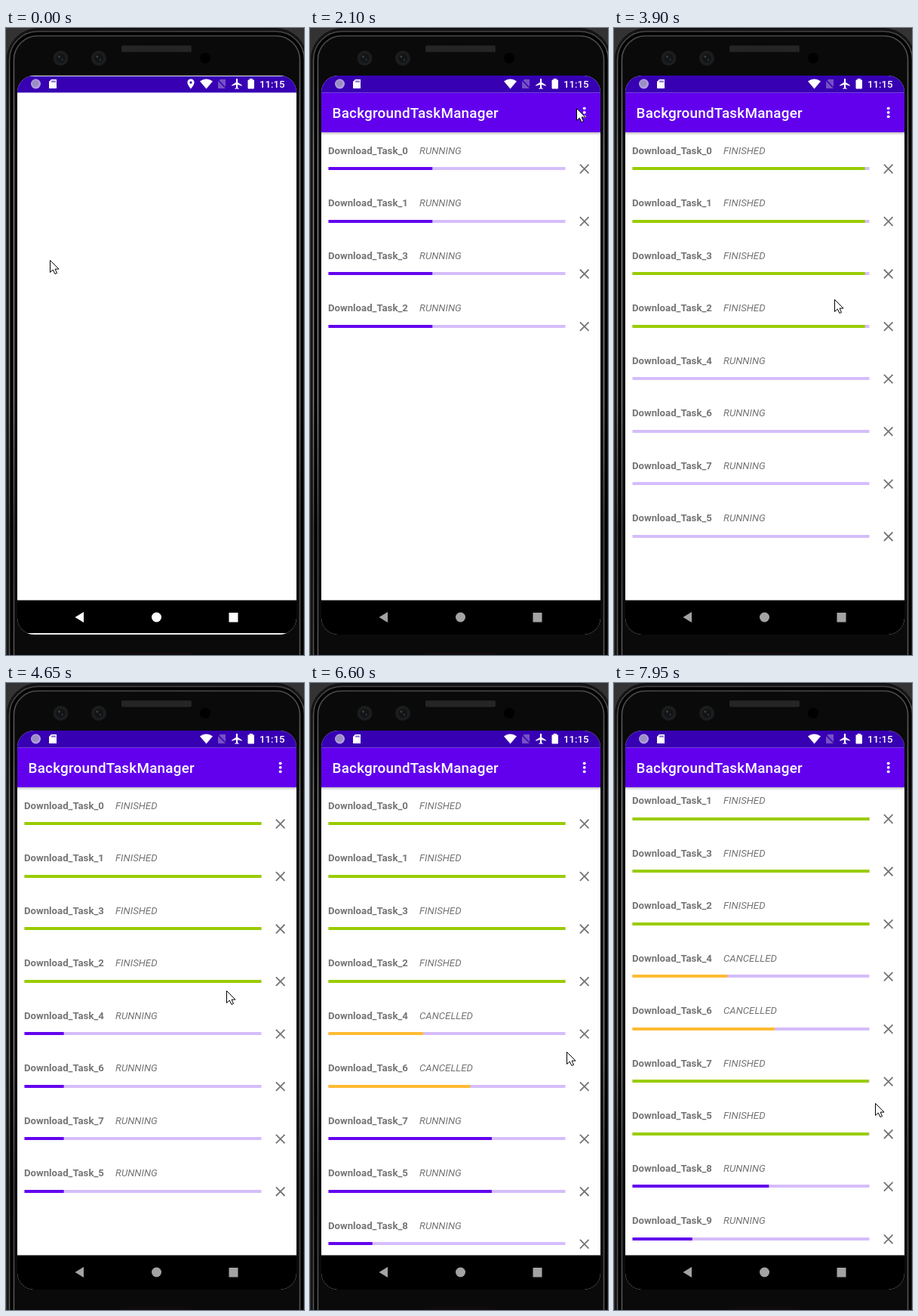
These frames come from a looping animation (395x830 px, 8 s). An HTML page with a canvas:

```html
<!DOCTYPE html>
<html lang="en">
<head>
<meta charset="utf-8">
<title>Background tasks</title>
<style>
html, body { margin: 0; height: 100%; overflow: hidden; background: #0a0a0a; }
canvas { display: block; }
</style>
</head>
<body>
<canvas id="stage" width="395" height="830"></canvas>
<script>
const g = document.getElementById('stage').getContext('2d');
const LOOP = 8000, STEP = 716, PITCH = 69.53, OPEN = 150;
const DRAG = 6680, DROP = 6900, CANCEL = { 4: 5441, 6: 6465 };

// Four tasks run at once; every cancelled one makes room for the next
const batch = (start, ids) => ids.map(id => ({ id, start, cancel: CANCEL[id] ?? Infinity }));
const tasks = [
  ...batch(-86, [0, 1, 3, 2]), ...batch(3634, [4, 6, 7, 5]),
  ...batch(CANCEL[4], [8]), ...batch(CANCEL[6], [9])
];

// Pointer stops: time, x, y
const stops = [
  [0, 58, 307], [OPEN, 58, 307], [700, 270, 309], [1100, 270, 309], [1650, 383, 90],
  [2200, 350, 107], [3450, 292, 336], [4650, 292, 407], [CANCEL[4], 362, 462],
  [5700, 353, 514], [CANCEL[6], 360, 531], [DROP, 274, 344], [7400, 352, 530],
  [7950, 346, 556], [LOOP, 346, 556]
];

const clamp = (v, a = 0, b = 1) => Math.min(b, Math.max(a, v));
const ramp = (t, a, b) => clamp((t - a) / (b - a));
const smooth = k => k * k * (3 - 2 * k);

function rect(x, y, w, h, color) {
  g.fillStyle = color;
  g.fillRect(x, y, w, h);
}
function round(x, y, w, h, r, color) {
  g.beginPath();
  g.roundRect(x, y, w, h, r);
  if (color) {
    g.fillStyle = color;
    g.fill();
  }
}
function disc(x, y, r, color) {
  g.beginPath();
  g.arc(x, y, r, 0, 7);
  g.fillStyle = color;
  g.fill();
}
function shape(path, x, y, fill, stroke, width = 1) {
  const p = new Path2D(path);
  g.save();
  g.translate(x, y);
  if (fill) {
    g.fillStyle = fill;
    g.fill(p);
  }
  if (stroke) {
    g.strokeStyle = stroke;
    g.lineWidth = width;
    g.stroke(p);
  }
  g.restore();
}
function text(str, x, y, font, color, spacing = 0) {
  g.font = font + ' Roboto, sans-serif';
  g.letterSpacing = spacing + 'px';
  g.fillStyle = color;
  g.fillText(str, x, y);
}

const CARD = 'M3 0h7v12h-10v-9z';
const PIN = 'M0-6.5a4.6 4.6 0 0 0-4.6 4.6c0 3.4 4.6 8.5 4.6 8.5s4.6-5.1 4.6-8.5a4.6 4.6 0 0 0-4.6-4.6zm0 6.2a1.6 1.6 0 0 1 0-3.2 1.6 1.6 0 0 1 0 3.2z';
const WIFI = 'M0 6.5l-8.5-10q8.5-6 17 0z';
const PLANE = 'M6.7 2.8v-1.4l-5.6-3.5v-3.9a1 1 0 0 0-2.2 0v3.9l-5.6 3.5v1.4l5.6-1.7v3.8l-1.4 1v1.1l2.5-.7 2.5.7v-1.1l-1.4-1v-3.8z';
const ARROW = 'M0 0v16l3.8-3.4 2.6 5.4 2.6-1-2.4-5.4h4.9z';
const CROSS = 'M-5.8-5.8l11.6 11.6m0-11.6l-11.6 11.6';

// The phone is centred on x = 200, so its right rim runs off the stage
function rim(inset, width, color) {
  round(inset, inset, 400 - 2 * inset, 900, 42 - inset);
  g.lineWidth = width;
  g.strokeStyle = color;
  g.stroke();
}

function phone() {
  rect(0, 0, 395, 830, '#333');
  round(1, 0, 398, 900, 42, '#0a0a0a');
  const edge = g.createLinearGradient(0, 0, 0, 830);
  ['#444', '#808080', '#808080', '#808080', '#444', '#555'].forEach((c, i) => edge.addColorStop(i / 5, c));
  rim(2, 2, '#151515');
  rim(4.5, 1.5, edge);
  rim(7.5, 3, '#000');
  rim(10.5, 1.5, edge);
  for (const x of [72.5, 123]) {
    disc(x, 40, 10, '#1b1d1e');
    disc(x, 40, 6, '#121415');
    disc(x - 2, 38, 1.4, '#3c4245');
    disc(x + 2, 42, 1.2, '#30363a');
  }
  disc(264, 40, 7, '#000');
  round(153, 23, 93, 9, 2, '#1f1f1f');
  for (let x = 154; x < 245; x += 2) rect(x, 24, 1, 7, '#2b2b2b');
  rect(153, 827, 92, 3, '#120b0d');
}

function statusBar(t) {
  const back = '#3700b3', white = '#fff';
  rect(15, 63, 370, 22.5, back);
  disc(39.5, 74, 6.5, '#b39fdd');
  disc(39, 73.5, 4.6, '#9a8fc4');
  shape(CARD, 57, 68, white);
  for (let x = 60.5; x < 66; x += 2) rect(x, 69.5, 1, 2.5, back);
  if (t < OPEN) shape(PIN, 245, 74, white);
  shape(WIFI, 265.5, 74, white);
  shape(CARD, 281, 68, '#7650c6');
  shape('M0 0l12 12', 280, 68, null, back, 1.5);
  shape(PLANE, 306, 74, white);
  round(320.5, 68.5, 8.5, 12, 1, white);
  rect(322.8, 67, 4, 2, white);
  text('11:15', 336, 79, '500 13.2px', white);
}

function appBar() {
  const shade = g.createLinearGradient(0, 138, 0, 142);
  shade.addColorStop(0, 'rgba(0,0,0,.25)');
  shade.addColorStop(1, 'rgba(0,0,0,0)');
  rect(15, 138, 370, 4, shade);
  rect(15, 85.5, 370, 52.5, '#6200ee');
  text('BackgroundTaskManager', 29.5, 119, '500 18.85px', '#fff', .236);
  for (let i = -1; i < 2; i++) disc(363.7, 111.8 + 5.5 * i, 1.9, '#fff');
}

// Five steps of 20%, each easing out; a cancelled task takes no more steps
function progress(t, { start, cancel }) {
  let p = 0;
  for (let i = 1; i <= 5; i++) {
    const at = start + i * STEP;
    if (t > at && at < cancel) p += .2 * (1 - Math.exp((at - t) / 170));
  }
  return p;
}

function row(y, t, task) {
  const [state, color] =
    t >= task.cancel ? ['CANCELLED', '#ffbb33'] :
    t >= task.start + 5 * STEP ? ['FINISHED', '#99cc00'] : ['RUNNING', '#6200ee'];
  const top = Math.round(y - 2.3);
  text('Download_Task_' + task.id, 24, y - 20, 'bold 13.2px', '#757575');
  text(state, 145, y - 20, 'italic 13.2px', '#757575');
  rect(24.5, top, 314, 4, '#d5bdfb');
  rect(24.5, top, 314 * progress(t, task), 4, color);
  shape(CROSS, 363.7, y, null, '#757575', 1.8);
}

function list(t) {
  g.save();
  g.beginPath();
  g.rect(15, 138, 370, 620);
  g.clip();
  const held = clamp(t, DRAG, DROP);
  const scroll = clamp(pointerAt(DRAG).y - pointerAt(held).y, 0, 76);
  tasks.forEach((task, i) => {
    if (t >= task.start) row(186.5 + i * PITCH - scroll, t, task);
  });
  const glow = ramp(t, DROP - 50, DROP) * (1 - ramp(t, DROP + 100, DROP + 400));
  if (glow) disc(235, 1318 - 45 * glow, 560, `rgba(98,0,238,${.15 * glow})`);
  g.restore();
}

function toast(t) {
  g.globalAlpha = ramp(t, OPEN, 400) * (1 - ramp(t, 1750, 1950));
  round(141, 689, 117, 46, 23, '#efefef');
  text('Before Start', 163.5, 717, '13.2px', '#222');
  g.globalAlpha = 1;
}

function navBar(t) {
  rect(15, 757.5, 370, 46, '#000');
  const v = Math.round(255 - 92 * ramp(t, OPEN, 800));
  const color = `rgb(${v},${v},${v})`;
  shape('M0 0l11.5-7v14z', 91.5, 780, color);
  disc(199.5, 780, 6.5, color);
  rect(295.5, 774, 12, 12.5, color);
}

function pointerAt(t) {
  const i = Math.max(1, stops.findIndex(s => s[0] > t));
  const [t0, x0, y0] = stops[i - 1], [t1, x1, y1] = stops[i];
  const k = smooth(ramp(t, t0, t1));
  return { x: Math.round(x0 + (x1 - x0) * k), y: Math.round(y0 + (y1 - y0) * k) };
}

function pointer(t) {
  const { x, y } = pointerAt(t);
  const clicked = Object.values(CANCEL).some(c => Math.abs(t - c) < 50);
  if (clicked || t >= DRAG && t < DROP + 100) disc(x, y, 12, 'rgba(255,255,60,.7)');
  shape(ARROW, x + .5, y + .5, '#fff', '#000');
}

function draw(t) {
  phone();
  g.save();
  round(15, 63, 370, 740, 22);
  g.clip();
  rect(15, 63, 370, 740, '#fff');
  if (t >= OPEN) {
    list(t);
    appBar();
    toast(t);
  }
  statusBar(t);
  navBar(t);
  if (t < OPEN) {
    rect(15, 63, 370, 1, '#e8e4f4');
    rect(15, 801, 370, 2, '#eee');
  }
  g.restore();
  pointer(t);
}

const start = performance.now();
function tick() {
  draw((performance.now() - start) % LOOP);
  requestAnimationFrame(tick);
}
tick();
</script>
</body>
</html>
```
